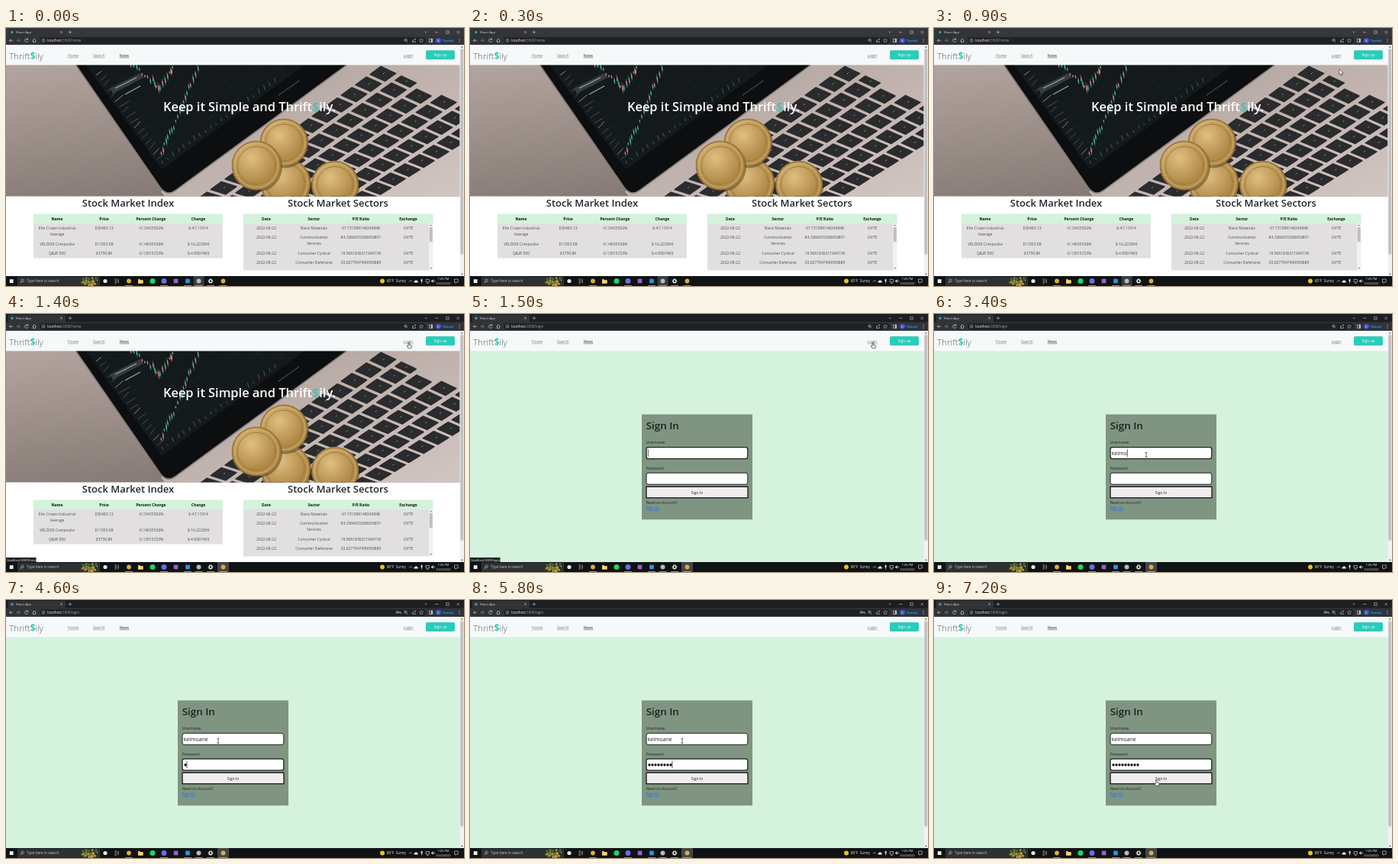
An HTML page for the animation above (8 s loop, 600 by 338 pixels).

```html
<!DOCTYPE html>
<html lang="en">
<head>
<meta charset="utf-8">
<title>Sign in demo</title>
<style>
html, body { margin: 0; width: 100%; height: 100%; overflow: hidden; background: #fff; }
svg { display: block; width: 100vw; height: 100vh; }
text { font-family: "Open Sans", "Noto Sans", sans-serif; white-space: pre; }
</style>
</head>
<body>
<svg id="stage" viewBox="0 0 600 338" preserveAspectRatio="none"></svg>
<script>
const LOOP = 8000;
const BRAND = ['Thrift', 'ily'];
const USER = 'kelmoane';
const TEAL = '#2acbb9', MINT = '#d4f2dc';

// Markup helpers
const rect = (x, y, w, h, fill, extra = '') =>
  `<rect x="${x}" y="${y}" width="${w}" height="${h}" fill="${fill}" ${extra}/>`;
const circle = (x, y, r, fill, extra = '') =>
  `<circle cx="${x}" cy="${y}" r="${r}" fill="${fill}" ${extra}/>`;
const path = (d, fill, extra = '') => `<path d="${d}" fill="${fill}" ${extra}/>`;
const line = (d, color, width = 0.7, extra = '') =>
  path(d, 'none', `stroke="${color}" stroke-width="${width}" ${extra}`);
const text = (x, y, str, size, fill, extra = '') =>
  `<text x="${x}" y="${y}" font-size="${size}" fill="${fill}" ${extra}>${str}</text>`;
const mid = (x, y, str, size, fill, extra = '') =>
  text(x, y, str, size, fill, 'text-anchor="middle" ' + extra);
const group = (id, body, extra = '') => `<g id="${id}" ${extra}>${body}</g>`;
const brand = (weight) =>
  `${BRAND[0]}<tspan fill="${TEAL}" font-weight="${weight}">$</tspan>${BRAND[1]}`;

function seeded(seed) {
  return () => (seed = (seed * 16807) % 2147483647) / 2147483647;
}

function defs() {
  const stop = (o, c) => `<stop offset="${o}" stop-color="${c}"/>`;
  return `<defs>
    <linearGradient id="desk" x2="0.4" y2="1">${stop(0, '#b3a49f')}${stop(1, '#857974')}</linearGradient>
    <linearGradient id="metal" x2="1" y2="1">${stop(0, '#a99c98')}${stop(0.5, '#c0b2ad')}${stop(1, '#d2c6c3')}</linearGradient>
    <radialGradient id="gold" cx="0.4" cy="0.35">${stop(0, '#dfbf80')}${stop(1, '#b18a48')}</radialGradient>
    <clipPath id="heroClip"><rect y="48" width="594.5" height="172.5"/></clipPath>
    <clipPath id="screenClip"><path d="M104 48H392L204 186Z"/></clipPath>
  </defs>`;
}

function chrome() {
  const pale = '#c9cbce';
  let s = rect(0, 0, 600, 11, '#1d1e21', 'id="tabStrip"') + rect(3, 1, 75, 10, '#323337', 'rx="2"')
    + rect(0, 10.5, 600, 11.5, '#323337')
    + circle(8, 5.5, 1.7, '#3a9fb5') + text(13, 7.2, 'React App', 4.3, '#d5d6d8')
    + line('M71 4l3 3m0-3l-3 3M84 3.3v4.4M81.8 5.5h4.4', pale, 0.6)
    + line('M548.500 4.500l1.500 1.600 1.500-1.600M562 5.500h4M576.800 3.800h3.400v3.400h-3.400zM590.500 3.800l3.400 3.400m0-3.400l-3.400 3.400', pale, 0.6)
    + line('M9 16.300H4.500m2-2l-2 2 2 2', pale)
    + line('M13.800 16.300H18m-2-2l2 2-2 2', '#898c90')
    + line('M28.600 15a2.200 2.200 0 1 0 .2 2M28.800 13.400v2h-2', pale)
    + line('M34.700 16.300L37 14l2.300 2.300M35.500 16v2.600h3V16', pale)
    + rect(44, 12.2, 506, 8.6, '#202124', 'rx="4.300"')
    + line('M49 15.800v2M49 14.600v.6', pale, 0.6) + circle(49, 16.3, 2, 'none', `stroke="${pale}" stroke-width=".5"`)
    + `<text x="54" y="18" font-size="4.500" fill="#f0f1f2">localhost<tspan fill="#9aa0a6" id="url"></tspan></text>`
    + group('key', circle(512.6, 16.2, 1.3, 'none', `stroke="${pale}" stroke-width=".9"`) + line('M514 16.200h3v1.500', pale, 0.9))
    + circle(523.5, 15.8, 1.6, 'none', `stroke="${pale}" stroke-width=".6"`) + line('M524.700 17l1.700 1.700M522.600 15.800h1.800', pale, 0.6)
    + line('M532.500 15.500v3h4v-1.500M533.800 17q.3-2.400 2.800-2.400m-1-1l1.200 1-1.200 1', pale, 0.6)
    + line('M544 13.700l.8 1.700 1.900.2-1.400 1.300.4 1.800-1.700-.9-1.700.9.4-1.800-1.400-1.300 1.900-.2z', pale, 0.5)
    + rect(554.7, 14.2, 4, 4.2, 'none', `stroke="${pale}" stroke-width=".7"`) + rect(556.9, 14.2, 1.8, 4.2, pale)
    + rect(562, 12, 26, 8.8, '#26374e', 'rx="4.400"') + circle(566.5, 16.3, 3.4, '#4457b8')
    + mid(566.5, 17.7, 'K', 3.8, '#fff') + text(572.2, 17.8, 'Paused', 4, '#8ab4f8');
  for (const y of [14.3, 16.3, 18.3]) s += circle(594, y, 0.55, pale);
  return s;
}

function navbar() {
  const link = (x, label, color) => text(x, 37.7, label, 4.95, color, 'text-decoration="underline"');
  return rect(0, 22, 594.5, 26.5, '#f6f9f9')
    + text(4, 40.5, brand(700), 11.7, '#5b6063', 'font-weight="300"')
    + link(81, 'Home', '#777c7e') + link(114, 'Search', '#777c7e') + link(148.6, 'News', '#33383a')
    + link(520.8, 'Login', '#74797b')
    + rect(550, 29.3, 38, 12, TEAL, 'rx="1.700"') + mid(569, 37.2, 'Sign up', 4.9, '#fff');
}

function coin(x, y, r) {
  const ring = (k, w, c, more = '') =>
    circle(x, y, r * k, 'none', `stroke="${c}" stroke-width="${w}" ${more}`);
  return circle(x + 1.5, y + 2, r, '#3a2c1c', 'opacity=".45"') + circle(x, y, r, 'url(#gold)')
    + ring(0.97, 1.1, '#8d6a33') + ring(0.88, 1.3, '#ebd39c', 'stroke-dasharray="1 1.600"')
    + ring(0.76, 0.8, '#94713a');
}

function keyboard() {
  // Bilinear grid across the keyboard's four corners
  const A = [243, 226], B = [490, 47], C = [650, 122], D = [405, 275];
  const at = (u, v) => [0, 1].map(i =>
    (A[i] * (1 - u) + B[i] * u) * (1 - v) + (D[i] * (1 - u) + C[i] * u) * v);
  const quad = (u, v, w, h) =>
    'M' + [at(u, v), at(u + w, v), at(u + w, v + h), at(u, v + h)]
      .map(p => p.map(n => n.toFixed(1)).join(' ')).join('L') + 'Z';
  const rows = 6, cols = 13;
  let s = '';
  for (let r = 0; r < rows; r++) {
    const shift = r * 0.32 % 1;
    for (let c = -1; c < cols; c++) {
      const u = Math.max(0, (c + shift) / cols), end = Math.min(1, (c + 1 + shift) / cols);
      if (end - u < 0.03) continue;
      s += path(quad(u + 0.01, r / rows + 0.023, end - u - 0.02, 1 / rows - 0.046), '#292b2d',
        'stroke="#292b2d" stroke-width="1.600" stroke-linejoin="round"');
      const [x, y] = at((u + end) / 2, (r + 0.5) / rows);
      s += line(`M${x.toFixed(1)} ${y.toFixed(1)}l2-1.400`, '#9b9b9b', 0.9);
    }
  }
  return s;
}

function market() {
  const rnd = seeded(77);
  let s = path('M104 48H392L204 186Z', '#14191c');
  for (let i = 0; i < 10; i++) s += line(`M${104 + i * 28} 48l92 132`, '#232c2f', 0.4);
  for (let i = 0; i < 8; i++) s += line(`M110 ${75 + i * 22}l300-213`, '#232c2f', 0.4);
  for (let i = 0; i < 17; i++) {
    const x = 118 + i * 5, y = 62 + i * 6.9;
    s += line(`M${x} ${y}l${7 + rnd() * 7}-${5 + rnd() * 4}`, i % 5 ? '#57615f' : '#a3aaa8', 0.8);
  }
  s += path('M136 79l40-20 4 6-40 21z', '#343d41') + line('M143 79l28-14M156 87l20-11', '#a0a7a5', 1.2);
  const runs = [
    [[163, 48], [178, 60], [192, 70], [201, 78], [214, 60], [219, 48]],
    [[203, 164], [211, 141], [222, 125], [232, 98], [241, 73], [254, 50]]];
  for (const run of runs) {
    for (let k = 0; k < run.length - 1; k++) {
      const [x0, y0] = run[k], [x1, y1] = run[k + 1];
      for (let j = 0; j < 4; j++) {
        const x = x0 + (x1 - x0) * j / 4, y = y0 + (y1 - y0) * j / 4 + rnd() * 6 - 3;
        const h = 2 + rnd() * 5, color = rnd() < 0.65 ? '#4fb69f' : '#d08a78';
        s += line(`M${x} ${y - h}l${h * 0.3} ${h * 2}`, color, 0.5)
          + line(`M${x + h * 0.1} ${y - h / 2}l${h * 0.15} ${h}`, color, 1.4);
      }
    }
  }
  for (let i = 0; i < 22; i++) {
    s += line(`M${206 + i * 7} ${178 - i * 5.1}l-${1 + rnd() * 2}-${2 + rnd() * 5}`, i % 3 ? '#236d5f' : '#7c4641', 1);
  }
  return group('market', s, 'clip-path="url(#screenClip)"');
}

function hero() {
  const photo = rect(0, 48, 595, 173, 'url(#desk)')
    + path('M203 214L445 48H595V221H208Z', 'url(#metal)')
    + path('M92 48H446L222 212Q211 220 203 209Z', '#0c0e10')
    + line('M91 48L202 209Q211 221 222 213L447 48', '#807673', 1.3)
    + market() + keyboard()
    + line('M357 88l27-19', '#55575a', 1.3, 'stroke-dasharray="2 .8"')
    + coin(431, 205, 31) + coin(366, 203, 33) + coin(364, 150, 31.5) + coin(328, 180, 32.5);
  return `<g clip-path="url(#heroClip)">${photo}</g>`
    + text(206, 108.5, `Keep it Simple and ${brand(600)}.`, 16.4, '#fff', 'font-weight="600"');
}

function table(x, width, bodyWidth, bottom, cols, heads, rows) {
  const ink = '#4b4d50';
  let s = rect(x, 256, bodyWidth, bottom - 256, '#e2dfe0') + rect(x, 243.5, width, 12.7, MINT);
  heads.forEach((h, i) => s += mid(cols[i], 251.7, h, 5, '#111', 'font-weight="700"'));
  rows.forEach(([y, ...cells]) => cells.forEach((cell, i) =>
    cell.split('|').forEach((part, n) => s += mid(cols[i], y + n * 8, part, 5, ink))));
  return s;
}

function home() {
  const date = '2022-06-22', ex = 'OVTE';
  const title = (x, s) => mid(x, 234.2, s, 13, '#212529', 'font-weight="600"');
  return rect(0, 48, 595, 277, '#fff') + hero()
    + title(160, 'Stock Market Index') + title(435, 'Stock Market Sectors')
    + table(36, 248, 248, 301.5, [67, 128.5, 190, 252], ['Name', 'Price', 'Percent Change', 'Change'], [
      [264, 'Elm Crown Industrial|Average', '$30483.13', '-0.15433592%', '$-47.11914'],
      [284.7, 'VELDOR Composite', '$11053.08', '-0.14655536%', '$-16.222656'],
      [297, 'Q&amp;W 500', '$3759.89', '-0.13015723%', '$-4.9001465']])
    + table(311, 248.5, 243, 317.5, [341, 403.5, 465, 527], ['Date', 'Sector', 'P/E Ratio', 'Exchange'], [
      [264, date, 'Basic Materials', '67.731099148345848', ex],
      [276.3, date, 'Communication|Services', '84.3366933268656851', ex],
      [297, date, 'Consumer Cyclical', '19.9651836211640159', ex],
      [309.3, date, 'Consumer Defensive', '20.6277947409090885', ex]])
    + rect(554, 256, 5.5, 61.5, '#f1f1f1') + rect(554.7, 261, 4, 19, '#bfbfbf')
    + path('M555.300 259.300h2.800l-1.400-1.700zM555.300 314h2.800l-1.400 1.700z', '#777');
}

function login() {
  const ink = '#202522';
  const field = (id, y) => rect(231, y, 132.8, 15, '#fff', `id="${id}" rx="2.800" stroke="#222" stroke-width="1"`);
  let dots = '';
  for (let i = 0; i < 9; i++) dots += circle(235 + i * 4, 216, 1.65, '#111', 'class="dot"');
  return rect(0, 48, 595, 277, MINT) + rect(225, 131.5, 145, 137.8, '#7f9582')
    + text(230.7, 150.6, 'Sign In', 13.4, '#1c211e', 'font-weight="600"')
    + text(230.7, 170.2, 'Username:', 5, ink) + field('userBox', 174.7)
    + text(230.7, 203.7, 'Password:', 5, ink) + field('passBox', 208.2)
    + text(232.7, 184.6, '', 7, '#222', 'id="user"') + dots
    + rect(0, 0, 0.7, 9.5, '#111', 'id="caret"')
    + rect(231, 226.3, 133, 14.5, '#f0ecf0', 'stroke="#161816" stroke-width="1.300"')
    + mid(297.5, 235.7, 'Sign In', 5, '#222')
    + text(230.7, 248.9, 'Need an Account?', 4.85, ink)
    + text(230.7, 256.3, 'Sign Up', 4.85, '#1c6fe0', 'text-decoration="underline"');
}

function scrollbar() {
  return rect(594.5, 22, 5.5, 303, '#f1f1f1') + rect(595.3, 27.5, 3.9, 269, '#c1c1c1')
    + path('M595.800 25.500h3l-1.500-1.800zM595.800 321.800h3l-1.500 1.800z', '#555');
}

function taskbar() {
  const rnd = seeded(5);
  let s = rect(0, 325, 600, 13, '#0f1315') + rect(4.8, 329.2, 4.8, 4.8, '#e8f2f8')
    + rect(15, 325.7, 108, 12, '#2d3133')
    + circle(21.5, 331, 1.7, 'none', 'stroke="#ddd" stroke-width=".6"') + line('M20.300 332.300l-1.800 1.900', '#ddd', 0.6)
    + text(27.3, 333.4, 'Type here to search', 4.6, '#c3c6c8');
  const petals = ['#4f7d3a', '#d99a2b', '#87a24c', '#2f5528', '#c2803a'];
  for (let i = 0; i < 40; i++) s += circle(100 + rnd() * 21, 327 + rnd() * 10, 1 + rnd(), petals[i % 5]);
  s += rect(245.5, 325, 14, 13, '#373c3f', 'id="recorderOn"') + rect(277, 325, 15, 13, '#40464a', 'id="browserOn"')
    + circle(130, 331.5, 2.6, '#e6e8e9')
    + line('M142.500 329h2.500M142.500 334h2.500M142.500 331.500h2.500M147 329v5', '#ddd', 0.8)
    + circle(161, 331.5, 2.9, '#d9af37')
    + path('M173 329h2.500l.8 1h3.200v4.500H173z', '#e9bd53') + rect(173, 331, 6.5, 3.5, '#f5d67b')
    + circle(192, 331.5, 3.5, '#1ed760') + circle(207, 331.5, 3.5, '#6270e8')
    + rect(219.7, 328.7, 5.6, 5.6, '#9464c9') + rect(235.2, 328.7, 5.6, 5.6, '#2798dc')
    + circle(252.5, 331.5, 3, '#b7babc')
    + circle(268, 331.5, 1.9, 'none', 'stroke="#eee" stroke-width="1.300"')
    + circle(268, 331.5, 2.9, 'none', 'stroke="#eee" stroke-width=".9" stroke-dasharray="1.140 1.140"')
    + circle(284.5, 331.5, 2.9, '#d9af37');
  for (const x of [161, 207, 238, 252.5, 268, 284.5]) s += rect(x - 5, 337.2, 10, 0.8, '#76b9ed');
  return s + circle(493, 331.5, 2.9, '#f4bd24')
    + text(499, 333.3, '80°F  Sunny', 4.5, '#eee')
    + line('M528 332.500l2-2 2 2', '#ddd')
    + path('M534.500 333.500q-.5-2 1.300-2.200 1.400-2.300 2.800 0 1.800.3 1 2.200z', '#eee')
    + rect(543.6, 328.8, 2, 4, '#ddd', 'rx="1"') + line('M544.600 333v1.600', '#ddd')
    + line('M550 329.500h4.500v3.500H550zM551 334.500h2.500', '#ddd', 0.6)
    + path('M557 330.700h1.200l1.600-1.400v4.400l-1.600-1.400H557z', '#ddd') + line('M561 330q1 1.500 0 3', '#ddd', 0.6)
    + mid(573, 330.4, '7:00 PM', 4, '#eee') + mid(573, 336.2, '6/22/2022', 4, '#eee')
    + line('M587.500 329h4.800v4h-2.400l-1 1.300V333h-1.400z', '#ddd', 0.6);
}

function overlays() {
  return group('status', rect(0, 319, 39.5, 6.2, '#242629') + text(1.5, 323.5, '', 4, '#d7d9db', 'id="link"'))
    + group('arrow', path('M0 0V7.200L1.700 5.700 2.900 8.300 4 7.800 2.900 5.300H5.200Z', '#fff', 'stroke="#111" stroke-width=".5"'))
    + group('hand', path('M-.8-3.500Q0-4.300.7-3.500V-.6L3.100 0Q3.700.3 3.500 1.200L2.900 4H-.8L-2.700 1.100Q-2.700 0-1.600.5L-.8 1.200Z', '#fff', 'stroke="#111" stroke-width=".6"'))
    + group('beam', line('M-1.300-3H1.300M0-3V3M-1.300 3H1.300', '#222', 0.7));
}

const stage = document.getElementById('stage');
stage.innerHTML = defs() + group('home', home()) + group('login', login())
  + navbar() + scrollbar() + chrome() + taskbar() + overlays();

const el = id => document.getElementById(id);
const show = (node, on) => node.setAttribute('visibility', on ? 'inherit' : 'hidden');
const place = (node, x, y) => node.setAttribute('transform', `translate(${x} ${y})`);
const count = (times, t) => times.filter(k => t >= k).length;
const dots = [...document.querySelectorAll('.dot')];

const userKeys = [3000, 3100, 3200, 3300, 3400, 3600, 3700, 3900];
const passKeys = [4600, 5000, 5100, 5100, 5300, 5400, 5500, 5800, 6100];
const route = [[500, 604, 125], [900, 531, 54], [1200, 528, 41], [1500, 528, 41],
  [2200, 278, 184.5], [6500, 278, 184.5], [7200, 291.5, 239.5]];

function pointer(t) {
  const i = route.findIndex(p => p[0] > t);
  if (i === 0) return route[0].slice(1);
  if (i < 0) return route[route.length - 1].slice(1);
  const [t0, x0, y0] = route[i - 1], [t1, x1, y1] = route[i];
  const u = (t - t0) / (t1 - t0), e = u * u * (3 - 2 * u);
  return [x0 + (x1 - x0) * e, y0 + (y1 - y0) * e];
}

function render(now) {
  const t = Math.floor((now % LOOP) / 100) * 100;
  const signing = t >= 1500, inPass = t >= 4300, active = t >= 1400;
  show(el('home'), !signing);
  show(el('login'), signing);
  show(el('recorderOn'), !active);
  show(el('browserOn'), active);
  el('tabStrip').setAttribute('fill', active ? '#1d1e21' : '#36383d');
  show(el('key'), t >= 4600);
  el('url').textContent = signing ? ':3000/login' : ':3000/home';

  const typed = count(userKeys, t), masked = count(passKeys, t);
  el('user').textContent = USER.slice(0, typed);
  dots.forEach((d, i) => show(d, signing && i < masked));
  el('userBox').setAttribute('stroke-width', inPass ? 1 : 1.3);
  el('passBox').setAttribute('stroke-width', inPass ? 1.3 : 1);
  const caretX = inPass ? 232.6 + masked * 4 : 232.9 + (typed ? el('user').getComputedTextLength() : 0);
  place(el('caret'), caretX, inPass ? 211 : 177.4);
  show(el('caret'), signing && !(t >= 2500 && t < 3000) && t < 6600);

  const [x, y] = pointer(t);
  const overLink = x > 519 && x < 535 && y > 31 && y < 43;
  const inField = signing && x > 231 && x < 364 && ((y > 174 && y < 190) || (y > 208 && y < 223));
  const overButton = signing && x > 231 && x < 364 && y > 226 && y < 241;
  const kind = overLink || overButton ? 'hand' : inField ? 'beam' : 'arrow';
  for (const id of ['arrow', 'hand', 'beam']) {
    show(el(id), id === kind && x < 600);
    place(el(id), x, y);
  }
  show(el('status'), overLink);
  el('link').textContent = 'localhost:3000/' + (signing ? 'login#' : 'home#');
}

const start = performance.now();
function tick() {
  render(performance.now() - start);
  requestAnimationFrame(tick);
}
tick();
</script>
</body>
</html>
```
